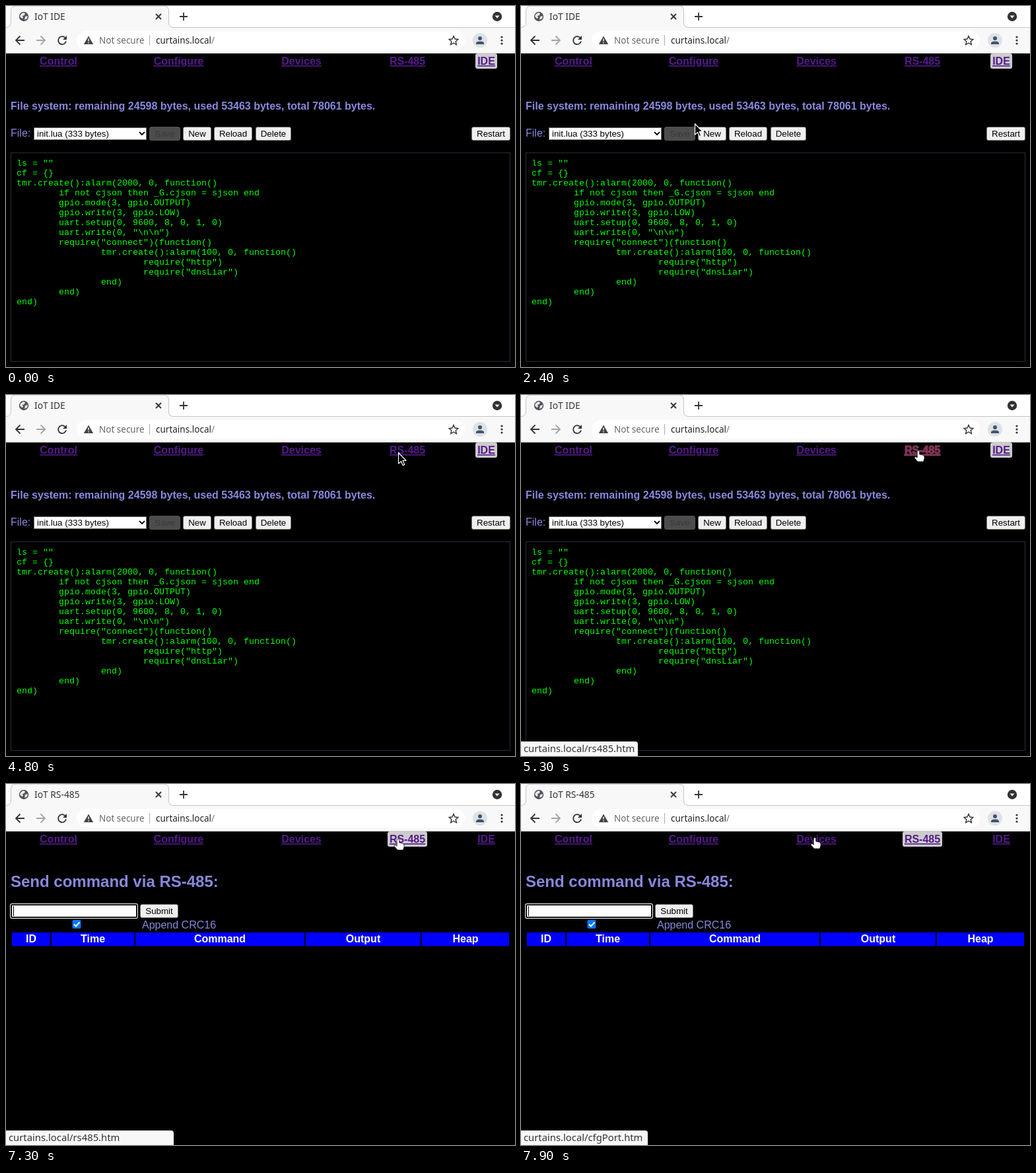
Write an HTML page that moves like this. It is 771 px wide and 547 px high and loops after 8000 ms.

```html
<!DOCTYPE html>
<html lang="en">
<head>
<meta charset="utf-8">
<title>IoT IDE</title>
<style>
  html, body { margin: 0; width: 100%; height: 100%; overflow: hidden; background: #000; }
  svg { display: block; }
  text { white-space: pre; }
  .ui { font: 13.5px "Noto Sans", sans-serif; fill: #333; }
  .page { font: 16px "Liberation Sans", Arial, sans-serif; fill: #8888dd; }
  .bold { font-weight: bold; }
  .mid { text-anchor: middle; }
  .link { font-weight: bold; fill: #551a8b; text-decoration: underline; }
  .control { font-size: 13.333px; fill: #000; }
  .code { font: 13.333px "Liberation Mono", "Courier New", monospace; fill: #0f0; }
  .line { fill: none; stroke: #333; stroke-width: 1.8; }
</style>
</head>
<body>
<svg width="771" height="547" viewBox="0 0 771 547">
  <rect width="771" height="547"/>

  <!-- browser window -->
  <g class="ui">
    <rect width="771" height="71.5" fill="#f8f8f8"/>
    <path d="M0 0H771V32H255Q247 32 247 24V8Q247 0 239 0H15Q7 0 7 8V24Q7 32 0 32Z" fill="#fff"/>
    <path d="M0 32.5Q7.500 32.500 7.500 25V8Q7.500 0 15 0H239Q246.500 0 246.500 8V25Q246.500 32.500 254 32.500H771" fill="none" stroke="#c4c4c4"/>
    <circle cx="27" cy="16" r="7.200" fill="#50545a"/>
    <path d="M22 13l4-3 3 1-1 3-3 1 1 3-2 1-3-3zM29 16l4-1-1 4-4 2z" fill="#e8e8e8"/>
    <text id="tab" x="43" y="21" font-size="13.8"></text>
    <path class="line" d="M227 12l8 8m0-8l-8 8M263 16h12m-6-6v12"/>
    <circle cx="744" cy="16" r="7.200"/>
    <path d="M740.500 14.500h7l-3.500 4z" fill="#fff"/>

    <rect x="107" y="38" width="588" height="28" rx="14" fill="#fff"/>
    <path id="arrow" class="line" d="M28 52H15.500M21.500 45.500L15 52l6.500 6.500"/>
    <path class="line" d="M46 52h12.500M52.500 45.500L59 52l-6.500 6.500" style="stroke:#a4a4a4"/>
    <path class="line" d="M89.500 48A6 6 0 1 0 91 53.500"/>
    <path d="M92 45v6h-6z"/>
    <path d="M125 45.500l7.200 12.500h-14.400z" fill="#444"/>
    <path d="M125 49.500v4m0 1.500v1.500" stroke="#fff" stroke-width="1.400"/>
    <text x="141" y="57" fill="#666" style="fill:#666">Not secure</text>
    <path d="M217.500 44v16" stroke="#aaa"/>
    <text x="227" y="57" style="fill:#222">curtains.local<tspan fill="#777">/</tspan></text>
    <path class="line" style="stroke-width:1.400" d="M678 45.500l2 4.500 4.800.5-3.600 3.200 1.100 4.800-4.300-2.500-4.300 2.500 1.100-4.800-3.600-3.200 4.800-.5z"/>
    <circle cx="718" cy="52" r="11" fill="#dde2e7"/>
    <circle cx="718" cy="49" r="3" fill="#44546a"/>
    <path d="M712 58v-1.500q0-3 6-3t6 3V58z" fill="#44546a"/>
    <g fill="#333"><circle cx="751" cy="47" r="1.600"/><circle cx="751" cy="52" r="1.600"/><circle cx="751" cy="57" r="1.600"/></g>
    <path d="M0 71.500H771" stroke="#ccc"/>
  </g>

  <g class="page">
    <rect id="chip" y="72" height="23" rx="3" fill="#ccc"/>
    <g id="nav" class="mid"></g>

    <g id="ide">
      <text class="bold" x="7" y="157">File system: remaining 24598 bytes, used 53463 bytes, total 78061 bytes.</text>
      <text x="7" y="198">File:</text>
      <rect x="42.500" y="184.500" width="170" height="18" fill="#fff" stroke="#767676"/>
      <text class="control" x="47" y="198">init.lua (333 bytes)</text>
      <path class="line" style="stroke:#000" d="M202 191l4 4 4-4"/>
      <rect x="7.500" y="222.500" width="756" height="316" fill="none" stroke="#2c2c38"/>
      <g id="code" class="code"></g>
    </g>

    <g id="serial">
      <text class="bold" x="7" y="156" font-size="24">Send command via RS-485:</text>
      <rect x="6" y="181" width="194" height="23" rx="3" fill="#fff"/>
      <rect x="8" y="183" width="190" height="19" rx="1" fill="#fff" stroke="#101010" stroke-width="2"/>
      <path d="M11.500 185v15" stroke="#000"/>
      <rect x="100.500" y="206" width="13" height="13" rx="2" fill="#0075ff"/>
      <path d="M103 212.500l3 3 5.500-6" fill="none" stroke="#fff" stroke-width="2"/>
      <text x="206" y="219">Append CRC16</text>
      <g id="head" class="bold mid"></g>
    </g>
  </g>

  <g id="status" class="ui">
    <path id="bubble" fill="#f8f8f8"/>
    <text x="4" y="541" font-size="14.8" style="font-size:14.8px"></text>
  </g>

  <g id="cursor" stroke-linejoin="round">
    <path id="pointer" d="M.5.500V17l4-3.600 2.700 6.200 2.600-1.200-2.700-6H12z" fill="#000" stroke="#fff" stroke-width="1.200"/>
    <path id="hand" d="M-1.800 1.500Q0-1.200 1.700 1.500V6l5.500 1.200Q9 7.800 9 10v2.500L7.500 17H-1L-5.800 11.500Q-6.500 9-4 9.500L-1.800 11z" fill="#fff" stroke="#000" stroke-width=".7"/>
  </g>
</svg>

<script>
const $ = id => document.getElementById(id);
const show = (el, on) => el.setAttribute("visibility", on ? "visible" : "hidden");

const links = [["Control", 79.5], ["Configure", 261.5], ["Devices", 447.5], ["RS-485", 608], ["IDE", 727.5]];
$("nav").innerHTML = links.map(([name, x]) => `<text class="link" x="${x}" y="89">${name}</text>`).join("");
const serialLink = $("nav").children[3];

const button = (label, x, w, y = 183, fill = "#efefef", edge = "#767676", ink = "#000") =>
  `<rect x="${x + .5}" y="${y + .5}" width="${w - 1}" height="20" rx="2.5" fill="${fill}" stroke="${edge}"/>
   <text class="control mid" x="${x + w / 2}" y="${y + 15}" style="fill:${ink}">${label}</text>`;
$("ide").insertAdjacentHTML("beforeend",
  button("Save", 217, 47, 183, "#4c4c4c", "#555", "#393939") + button("New", 268, 43) +
  button("Reload", 315, 58) + button("Delete", 378, 54) + button("Restart", 705, 59));
$("serial").insertAdjacentHTML("beforeend", button("Submit", 203, 58, 182));

const source = String.raw`ls = ""
cf = {}
tmr.create():alarm(2000, 0, function()
	if not cjson then _G.cjson = sjson end
	gpio.mode(3, gpio.OUTPUT)
	gpio.write(3, gpio.LOW)
	uart.setup(0, 9600, 8, 0, 1, 0)
	uart.write(0, "\n\n")
	require("connect")(function()
		tmr.create():alarm(100, 0, function()
			require("http")
			require("dnsLiar")
		end)
	end)
end)`;
$("code").innerHTML = source.split("\n").map((line, i) => {
  const text = line.trimStart();
  return `<text x="${16 + 64 * (line.length - text.length)}" y="${242 + 15 * i}">${text}</text>`;
}).join("");

const columns = [["ID", 9, 67], ["Time", 69, 194], ["Command", 196, 452], ["Output", 454, 628], ["Heap", 630, 762]];
$("head").innerHTML = columns.map(([name, a, b]) =>
  `<rect x="${a}" y="225" width="${b - a}" height="20.5" fill="#00f"/>
   <text x="${(a + b) / 2}" y="240" style="fill:#fff">${name}</text>`).join("");

// Cursor moves: first step, last step, destination
const moves = [
  [800, 800, 74, 7], [900, 1400, 243, 163], [1700, 1800, 254, 177], [2400, 2400, 263, 178],
  [2600, 3400, 572, 113], [3700, 3900, 581, 104], [4600, 4600, 587, 96], [4800, 4800, 594, 87],
  [5000, 5000, 602, 84], [7300, 7300, 594, 83], [7400, 7900, 445, 81]
];

function cursorAt(t) {
  let x = 74, y = 7;
  for (const [start, end, toX, toY] of moves) {
    if (t < start) break;
    const k = Math.min(1, (t - start + 100) / (end - start + 100));
    const eased = k * k * (3 - 2 * k);
    x += (toX - x) * eased;
    y += (toY - y) * eased;
  }
  return [Math.round(x), Math.round(y)];
}

function setStatus(path, width) {
  show($("status"), path);
  $("bubble").setAttribute("d", `M0 525H${width - 4}q4 0 4 4V547H0z`);
  $("status").lastElementChild.textContent = "curtains.local/" + path;
}

function setGlow(k) {
  const mix = (a, b) => Math.round(a + (b - a) * k);
  const color = `rgb(${mix(85, 128)},${mix(26, 52)},${mix(139, 88)})`;
  serialLink.style.cssText = `fill:${color};stroke:${color};stroke-width:${1.3 * k}px`;
}

function draw(now) {
  const t = Math.floor(now % 8000 / 100) * 100;
  const serial = t >= 5500;
  show($("ide"), !serial);
  show($("serial"), serial);
  $("tab").textContent = serial ? "IoT RS-485" : "IoT IDE";
  $("chip").setAttribute("x", serial ? 578 : 711);
  $("chip").setAttribute("width", serial ? 60 : 33);

  if (t < 5000) setStatus("", 4);
  else if (t < 7800) setStatus("rs485.htm", serial ? 254 : 177);
  else setStatus("cfgPort.htm", 192);

  setGlow(t >= 5000 && !serial ? Math.min(1, (t - 4900) / 400) : t === 7400 ? .25 : 0);

  const [x, y] = cursorAt(t);
  const overLink = t >= 5000 && (x > 577 || x < 480);
  $("cursor").setAttribute("transform", `translate(${x} ${y})`);
  show($("pointer"), t >= 800 && !overLink);
  show($("hand"), overLink);
  requestAnimationFrame(draw);
}
requestAnimationFrame(draw);
</script>
</body>
</html>
```
